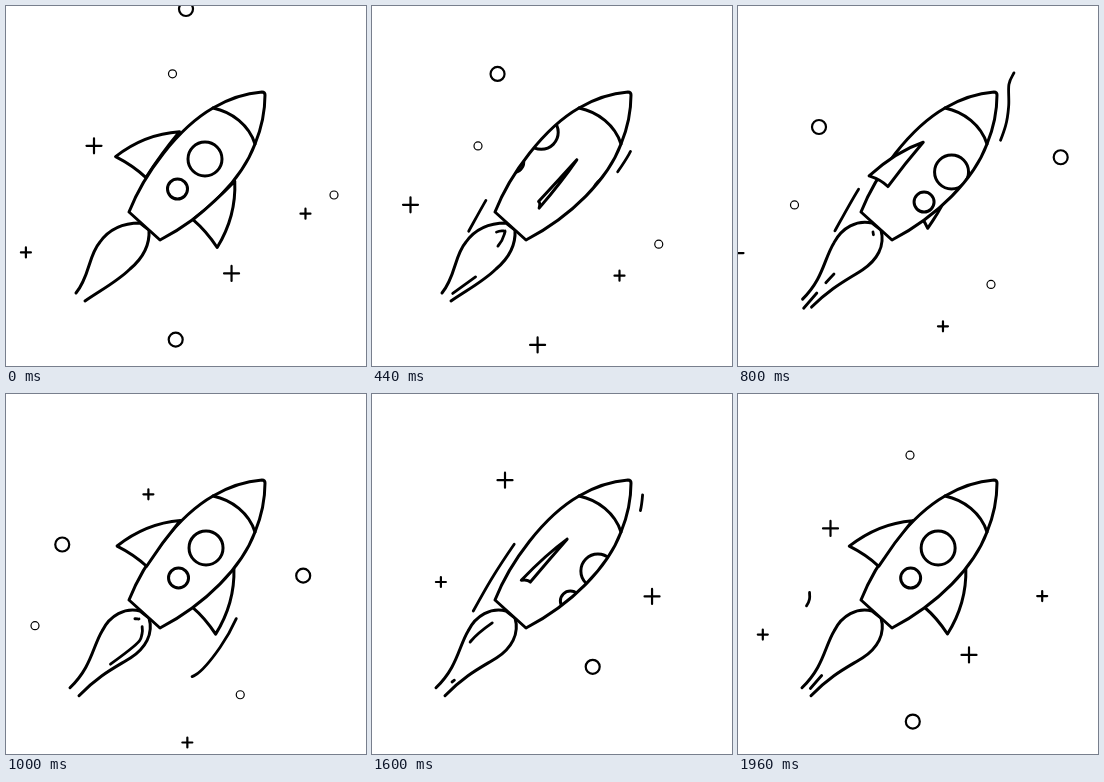
Animation, 360 px wide and 360 px high, one loop 2 s. Source, as an HTML page with a canvas:

```html
<!DOCTYPE html>
<html lang="en">
<head>
<meta charset="utf-8">
<title>Rocket</title>
<style>
  html, body { margin: 0; width: 100%; height: 100%; overflow: hidden; background: #fff; }
  canvas { display: block; width: 360px; height: 360px; }
</style>
</head>
<body>
<canvas id="stage" width="360" height="360"></canvas>
<script>
const ctx = document.getElementById('stage').getContext('2d');
const LOOP = 2000, STEP = 40;

// Rocket axes: u runs tail to nose, v across the body.
const at = (u, v) => [139 + .668 * u + .747 * v, 220 - .747 * u + .668 * v];
const mix = (a, b, k) => a + (b - a) * k;

// Drifters share one heading; each has a birth time, birthplace and pace.
const ring = (x, y, r) => ctx.arc(x, y, r, 0, Math.PI * 2);
const cross = (x, y, r) => {
  ctx.moveTo(x - r, y);
  ctx.lineTo(x + r, y);
  ctx.moveTo(x, y - r);
  ctx.lineTo(x, y + r);
};
const drifters = [
  { shape: ring, size: 7, born: 0, x: 180, y: 3, pace: .99 },
  { shape: ring, size: 7, born: 680, x: 338, y: 133, pace: 1.02 },
  { shape: ring, size: 4, born: 1800, x: 194, y: 35, pace: 1.1 },
  { shape: ring, size: 4, born: 0, x: 328, y: 189, pace: .75 },
  { shape: cross, size: 7.5, born: 1360, x: 160, y: 54, pace: .9 },
  { shape: cross, size: 7.5, born: 1160, x: 340, y: 131, pace: 1.09 },
  { shape: cross, size: 5, born: 840, x: 162, y: 77, pace: .98 },
  { shape: cross, size: 5, born: 1640, x: 342, y: 157, pace: .945 }
];

function drift(t) {
  for (const { shape, size, born, x, y, pace } of drifters) {
    const way = (t - born + LOOP) % LOOP * pace;
    ctx.lineWidth = shape === ring && size < 5 ? 1.2 : 2.2;
    ctx.beginPath();
    shape(x - .125 * way, y + .149 * way, size);
    ctx.stroke();
  }
}

// Smooth path through points
function curve(p) {
  const path = new Path2D();
  path.moveTo(...p[0]);
  for (let i = 0; i < p.length - 1; i++) {
    const a = p[i - 1] || p[i], b = p[i], c = p[i + 1], d = p[i + 2] || c;
    path.bezierCurveTo(b[0] + (c[0] - a[0]) / 6, b[1] + (c[1] - a[1]) / 6,
                       c[0] - (d[0] - b[0]) / 6, c[1] - (d[1] - b[1]) / 6, c[0], c[1]);
  }
  return path;
}

// Air flows from the nose, close to the hull or wide around the fins, on either side.
const bow = [[205, 0], [193, 4], [177, 18], [160, 29], [132, 40]];
const hull = [...bow, [84, 46], [62, 45], [14, 38], [-32, 28]];
const wide = [...bow, [100, 51], [63, 69], [25, 78], [-12, 78], [-34, 60], [-46, 58]];
const flow = (line, side) => curve(line.map(([u, v]) => at(u, v * side)));

// Each lane sends off streaks of [start time, length].
const wind = [
  { path: flow(hull, -1), speed: .7, runs: [[46, 60], [442, 48], [1255, 78]] },
  { path: flow(hull, 1), speed: .7, runs: [[289, 24], [1131, 28], [1527, 16]] },
  { path: flow(wide, 1), speed: .85, runs: [[718, 74]] },
  { path: flow(wide, -1), speed: .85, runs: [[1000, 14], [1640, 14]] }
];
const fire = [
  { path: curve([[133, 225], [123, 227], [99, 247], [89, 268], [77, 290]]),
    speed: .28, runs: [[408, 14], [985, 25], [1446, 29]] },
  { path: curve([[133, 226], [126, 240], [96, 268], [65, 303]]),
    speed: .28, runs: [[383, 13], [434, 20], [554, 12], [1631, 17]] },
  { path: curve([[135, 226], [136, 240], [127, 253], [80, 288]]),
    speed: .28, runs: [[126, 28], [790, 52], [1215, 22]] }
];

function streaks(lanes, t) {
  ctx.lineWidth = 2.8;
  for (const { path, speed, runs } of lanes) {
    for (const [start, len] of runs) {
      const head = (t - start) * speed;
      if (head <= 0) continue;
      ctx.setLineDash([len, 9999]);
      ctx.lineDashOffset = len - head;
      ctx.stroke(path);
    }
  }
  ctx.setLineDash([]);
}

const body = new Path2D('M123 206C138 168 172 122 207 102C224 92 243 87 256 86Q259 86 259 89' +
                        'C259 105 256 121 249 138C236 173 200 210 154 234Z');
const nose = new Path2D('M207 102C226 106 243 119 249 138');

// f is the fin's turn: 1 right, 0 edge-on, -1 left
function fin(f) {
  const p = (u, v) => at(u, v * f);
  ctx.beginPath();
  ctx.moveTo(...p(93, 37));
  ctx.quadraticCurveTo(...p(68, 61.5), ...p(32, 68));
  ctx.quadraticCurveTo(...p(37, 49), ...p(36.6, 31.5));
  ctx.quadraticCurveTo(...p(65, 36), ...p(93, 37));
  ctx.fill();
  ctx.stroke();
}

// k stretches the flame away from the tail
function flame(k) {
  const bend = (...ends) => ctx.bezierCurveTo(...ends.map(([a, b]) => mix(a, b, k)));
  ctx.beginPath();
  ctx.moveTo(mix(70, 62, k), mix(287, 296, k));
  bend([84, 86], [270, 274], [82, 88], [250, 254], [94, 97], [236, 237]);
  bend([104, 104], [222, 221], [119, 119], [217, 212], [134, 134], [217, 217]);
  ctx.lineTo(143, 224);
  bend([144, 149], [240, 240], [137, 140], [252, 255], [124, 125], [263, 264]);
  bend([112, 110], [275, 272], [95, 92], [284, 280], [79, 71], [295, 304]);
  ctx.fill();
  ctx.stroke();
}

// Portholes slide across the hull; the next pair follows one spacing behind.
function portholes(phase) {
  ctx.save();
  ctx.clip(body);
  for (const n of [0, 1]) {
    const off = (n - phase) * 92;
    for (const [x, y, r] of [[199, 153, 17], [171.5, 183, 10]]) {
      ctx.beginPath();
      ring(x + .747 * off, y + .668 * off, r);
      ctx.stroke();
    }
  }
  ctx.restore();
}

function draw(t) {
  // The second turn is slightly quicker than the first.
  const phase = (t * .985 + Math.max(0, t - 1000) * .055) / 1000 % 1;
  const f = 1 - 2 * phase;
  const stretch = .75 * Math.min(1, Math.max(0, (t - 440) / 400));

  ctx.fillStyle = '#fff';
  ctx.strokeStyle = '#000';
  ctx.lineJoin = ctx.lineCap = 'round';
  ctx.fillRect(0, 0, 360, 360);

  drift(t);
  streaks(wind, t);

  ctx.lineWidth = 3;
  flame(stretch);
  fin(-f);
  ctx.fill(body);
  portholes(phase);
  ctx.stroke(body);
  ctx.stroke(nose);
  fin(f);
  streaks(fire, t);
}

const start = performance.now();
function tick() {
  const t = (performance.now() - start) % LOOP;
  draw(Math.floor(t / STEP) * STEP);
  requestAnimationFrame(tick);
}
tick();
</script>
</body>
</html>
```
